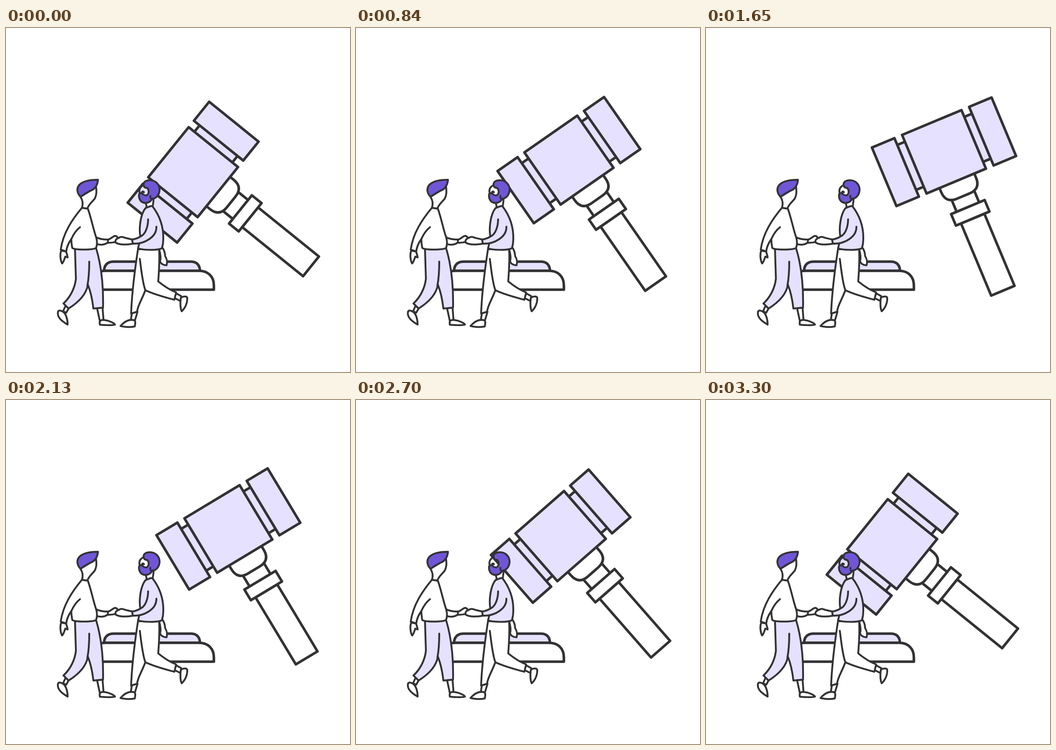
Write an HTML page that moves like this. It is 748x748 px and loops after 3330 ms.

```html
<!DOCTYPE html>
<html lang="en">
<head>
<meta charset="utf-8">
<title>Gavel and handshake</title>
<style>
  html, body { margin: 0; width: 100%; height: 100%; overflow: hidden; background: #fff; }
  svg { display: block; width: 100vw; height: 100vh; }
  path, rect { stroke: #323234; stroke-linejoin: round; stroke-linecap: round; }
  .thick { stroke-width: 5.6; }
  .thin { stroke-width: 4; }
  .w { fill: #fff; }
  .l { fill: #e6e1ff; }
  .p { fill: #7056d6; }
  .n { fill: none; }
</style>
</head>
<body>
<svg viewBox="0 0 748 748">
  <g class="thick">
    <path class="l" d="M213 528C214 515 221 508 234 508H402C415 508 421 515 422 528Z"/>
    <path class="w" d="M183 569V560C183 540 196 528 215 528H420C439 528 452 540 452 560V569Z"/>
  </g>

  <!-- gavel, upright around its own centre -->
  <g id="gavel" class="thick">
    <g transform="translate(1.5 0)">
      <rect class="w" x="-26.5" y="-30" width="53" height="32"/>
      <path class="w" d="M-41 -64V-51Q-41 -25 -15 -25H15Q41 -25 41 -51V-64Z"/>
      <rect class="w" x="-27.5" y="28" width="55" height="170"/>
      <rect class="w" x="-39.5" y="1" width="79" height="27"/>
    </g>
    <rect class="l" x="-90" y="-183" width="180" height="106"/>
    <rect class="l" x="-141" y="-199" width="53" height="138"/>
    <rect class="l" x="88" y="-199" width="53" height="138"/>
    <rect class="l" x="-70" y="-199" width="140" height="138"/>
  </g>

  <!-- left man -->
  <g class="thin">
    <path class="w" d="M130 603L124 616L131 619L136 610Z"/>
    <path class="w" d="M113 617C115 613 119 614 124 617C130 621 134 632 134 645C126 640 110 631 113 617Z"/>
    <path class="w" d="M198 609L204 637L212 635L210 608Z"/>
    <path class="w" d="M204 645C202 635 208 634 214 635C224 636 236 642 237 645C232 647 210 646 204 645Z"/>
    <path class="w" d="M120 484C117 492 118 505 122 512C126 508 127 502 129 497L134 499C134 494 131 490 131 486Z"/>
    <path class="l" d="M150 481L152 545C150 565 140 585 125 599L136 610C160 595 175 577 178 558C184 573 188 592 190 610L211 608C212 560 207 515 196 479Z"/>
    <path class="n" d="M181 508C181 530 180 545 177 560"/>
    <path class="w" d="M196 455C203 459 212 460 222 460C228 459 232 453 237 452C242 452 242 456 244 457L238 465C233 467 228 467 221 467C215 471 205 473 196 469Z"/>
    <path class="n" d="M222 460L221 467"/>
    <path class="w" d="M196 346C197 357 197 363 193 371C186 380 179 384 177 393L165 391C168 383 167 375 162 367L183 354Z"/>
    <path class="w" d="M165 391C145 415 124 445 119 482L131 486C132 475 137 466 142 459C142 467 143 473 144 478C148 483 190 483 196 478C199 470 198 462 196 455C190 438 185 412 178 393Z"/>
    <path class="n" d="M161 433C152 440 146 450 142 459"/>
    <path class="p" d="M200 330C199 345 190 352 183 354C175 358 166 364 162 367C155 360 153 350 158 343C165 333 180 330 200 330Z"/>
  </g>

  <!-- right man -->
  <g class="thin">
    <path class="w" d="M370 577L381 583L380 594L366 587Z"/>
    <path class="w" d="M380 587C384 583 392 583 394 586C395 598 389 610 382 616C378 608 379 596 380 587Z"/>
    <path class="w" d="M274 619L271 637L280 637L286 617Z"/>
    <path class="w" d="M249 648C256 640 266 633 277 635C283 636 281 643 280 649C270 651 257 650 249 648Z"/>
    <path class="w" d="M339 476C345 484 346 490 346 496C350 502 351 510 349 516C342 516 336 512 335 507C337 502 336 490 333 482Z"/>
    <path class="w" d="M287 481C281 520 274 570 272 621L285 617C286 604 296 590 303 570C320 579 345 585 366 591L370 575C355 569 342 560 331 551C333 525 334 500 333 481Z"/>
    <path class="n" d="M291 502C294 525 297 555 303 570"/>
    <path class="w" d="M303 380C306 385 306 389 305 392L319 388C320 382 321 377 321 368Z"/>
    <path class="l" d="M303 392C311 388 316 387 318 387C332 405 343 430 342 460C342 470 340 476 339 479C330 484 295 483 287 479L290 468C288 462 291 458 292 453C289 436 292 406 303 392Z"/>
    <path class="w" d="M275 460C266 458 262 457 258 456C252 453 249 454 246 456C240 458 236 462 239 467C250 473 265 471 276 469Z"/>
    <path class="l" d="M309 416C309 432 303 449 293 453C287 457 281 459 274 460L276 469C300 470 328 455 327 432" />
    <path class="n" d="M301 341C293 344 288 350 291 360"/>
    <path class="p" d="M301 346C296 338 301 331 313 331C325 331 334 340 334 352C333 364 326 371 318 371C314 380 303 383 295 378C288 372 288 362 291 359C297 358 299 365 305 364C311 362 312 353 307 348C304 347 302 347 301 346Z"/>
    <path class="n" d="M314 365C313 369 315 372 318 372M297 360C294 357 297 354 300 357"/>
  </g>
</svg>
<script>
  const LOOP = 3330, STEP = 30;
  // time, tilt in degrees, centre x, centre y
  const poses = [
    [0, 51.1, 508.1, 395.1],
    [300, 45.3, 518.9, 395.2],
    [840, 34.8, 537.2, 394],
    [1080, 30.6, 546, 393],
    [1590, 21.8, 567.5, 391],
    [1650, 22.7, 567.7, 389.1],
    [2130, 31, 550.5, 391.8],
    [2700, 41.2, 530.7, 393.8],
    [3300, 51.1, 506.1, 395.1]
  ];
  const gavel = document.getElementById("gavel");

  function poseAt(t) {
    const i = Math.max(1, poses.findIndex(p => p[0] >= t));
    const a = poses[i - 1], b = poses[i];
    const k = (t - a[0]) / (b[0] - a[0]);
    return a.map((v, j) => v + (b[j] - v) * k);
  }

  function draw(ms) {
    const t = Math.floor((ms % LOOP) / STEP) * STEP;
    const [, tilt, x, y] = poseAt(t);
    gavel.setAttribute("transform", `translate(${x} ${y}) rotate(${-tilt})`);
  }

  const start = performance.now();
  function tick() {
    draw(performance.now() - start);
    requestAnimationFrame(tick);
  }
  tick();
</script>
</body>
</html>
```
